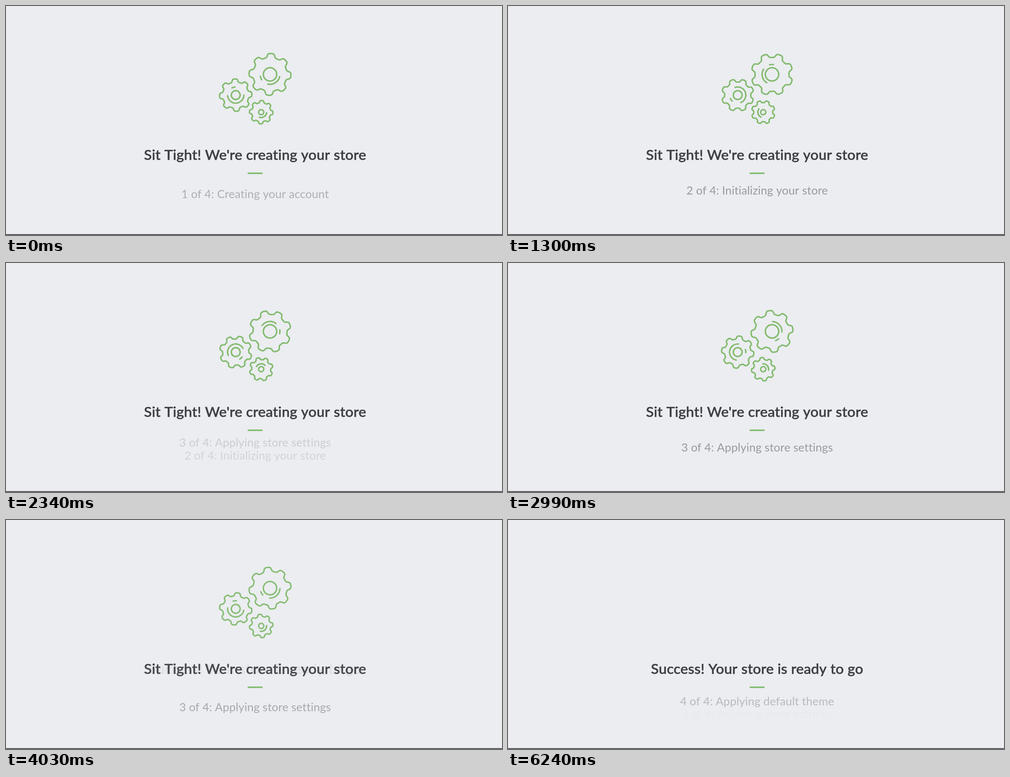
Recreate the animation shown at these times as an HTML page with a canvas. Size 1099 by 509 pixels, loop 6370 ms.

```html
<!DOCTYPE html>
<html lang="en">
<head>
<meta charset="utf-8">
<title>Creating your store</title>
<style>
  html, body { margin: 0; width: 100%; height: 100%; overflow: hidden; background: #ebedf0; }
  canvas { display: block; width: 1099px; height: 509px; }
</style>
</head>
<body>
<canvas id="stage" width="1099" height="509"></canvas>
<script>
const ctx = document.getElementById('stage').getContext('2d');

const LOOP = 6370, STEP = 130, HOLD = 4550;
const CX = 552;
const FAMILY = 'Lato, "Open Sans", sans-serif';
const TITLE = { font: '500 31.6px ' + FAMILY, color: '#3b3e43', gap: '0.25px', bold: 0.6 };
const LABEL = { font: '400 25.4px ' + FAMILY, color: '#989a9d', gap: '0.1px', bold: 0 };

const STEPS = [
  '1 of 4: Creating your account',
  '2 of 4: Initializing your store',
  '3 of 4: Applying store settings',
  '4 of 4: Applying default theme'
];
const SWAP_EVERY = 2040, OUT_LEAD = 170, OUT_TIME = 670, IN_TIME = 770;

// r, hub, arc: radii; mid, span, dash: angles of the inner arc and its dash
const GEARS = [
  { x: 585, y: 152, r: 46.4, hub: 14.8, arc: 22, dir: 1, mid: 58, span: 45, dash: 158 },
  { x: 509, y: 198, r: 35.8, hub: 9.8, arc: 18, dir: -1, mid: 88, span: 88, dash: 253 },
  { x: 565.5, y: 236, r: 26, hub: 5.7, arc: 12, dir: 1, mid: 58, span: 52 }
];
const TURN = [[0, 0], [520, 41.5], [1300, 109], [2340, 204], [3640, 316], [4550, 395]];

const clamp = v => Math.min(1, Math.max(0, v));
const rad = deg => deg * Math.PI / 180;

function turnAt(t) {
  let i = 1;
  while (i < TURN.length - 1 && t > TURN[i][0]) i++;
  const [t0, a0] = TURN[i - 1], [t1, a1] = TURN[i];
  return a0 + (a1 - a0) * (t - t0) / (t1 - t0);
}

function ring(r, from, to) {
  ctx.beginPath();
  ctx.arc(0, 0, r, rad(from), rad(to));
  ctx.stroke();
}

function toothed(r) {
  const sharp = 2.2, n = 320;
  ctx.beginPath();
  for (let i = 0; i < n; i++) {
    const a = i / n * Math.PI * 2;
    const q = r * (0.905 + 0.095 * Math.tanh(sharp * Math.cos(8 * a)) / Math.tanh(sharp));
    ctx.lineTo(q * Math.cos(a), q * Math.sin(a));
  }
  ctx.closePath();
  ctx.stroke();
}

function drawGear(g, turn) {
  ctx.save();
  ctx.translate(g.x, g.y);
  ctx.rotate(rad(g.dir * turn));
  ring(g.hub, 0, 360);
  ring(g.arc, g.mid - g.span, g.mid + g.span);
  if (g.dash) ring(g.arc, g.dash - 11, g.dash + 11);
  ctx.rotate(rad(g.dir * 3));
  toothed(g.r);
  ctx.restore();
}

function text(str, y, style, alpha) {
  if (alpha <= 0) return;
  ctx.globalAlpha = alpha;
  ctx.font = style.font;
  ctx.letterSpacing = style.gap;
  ctx.fillStyle = ctx.strokeStyle = style.color;
  ctx.fillText(str, CX, y);
  if (style.bold) {
    ctx.lineWidth = style.bold;
    ctx.strokeText(str, CX, y);
  }
  ctx.globalAlpha = 1;
}

function drawStep(str, i, t) {
  const enter = i ? clamp((t - (i - 1) * SWAP_EVERY) / IN_TIME) : 1;
  const leave = i < STEPS.length - 1
    ? clamp((t - i * SWAP_EVERY + OUT_LEAD) / OUT_TIME) : 0;
  const dy = 21 * (1 - (1 - leave) ** 1.5) - 20 * (1 - enter) ** 1.1;
  text(str, 419.3 + dy, LABEL, enter * (1 - leave));
}

function draw(t) {
  ctx.fillStyle = '#ebedf0';
  ctx.fillRect(0, 0, 1099, 509);

  const done = clamp((t - 4000) / 500);
  if (done < 1) {
    ctx.save();
    ctx.globalAlpha = 1 - done;
    ctx.translate(0, -8 * done);
    ctx.strokeStyle = '#82ba6e';
    ctx.lineWidth = 3.2;
    ctx.lineCap = ctx.lineJoin = 'round';
    const turn = turnAt(t);
    GEARS.forEach(g => drawGear(g, turn));
    ctx.restore();
  }

  ctx.textAlign = 'center';
  ctx.lineJoin = 'round';
  text("Sit Tight! We're creating your store", 341.5, TITLE, 1 - done);
  text('Success! Your store is ready to go', 341.5, TITLE, done);
  STEPS.forEach((s, i) => drawStep(s, i, t));

  ctx.fillStyle = '#7aba67';
  ctx.fillRect(535.5, 370.2, 33, 3.2);
  ctx.fillStyle = '#55575a';
  ctx.fillRect(0, 507, 1099, 2);
}

const start = performance.now();
function tick() {
  const t = (performance.now() - start) % LOOP;
  draw(Math.min(HOLD, Math.floor(t / STEP) * STEP));
  requestAnimationFrame(tick);
}
tick();
</script>
</body>
</html>
```
